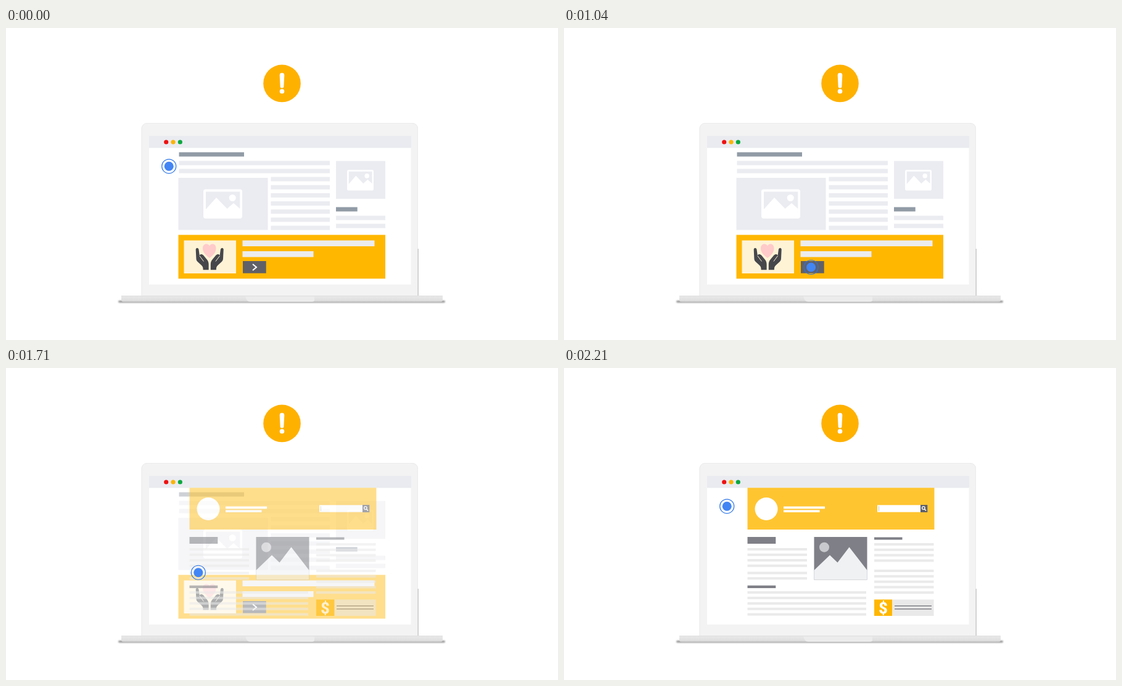
These frames come from a looping animation (895x506 px, 5.04 s). An HTML page:

```html
<!DOCTYPE html>
<html lang="en">
<head>
<meta charset="utf-8">
<title>Donation page on a laptop</title>
<style>
html, body { margin: 0; width: 100%; height: 100%; overflow: hidden; background: #fff; }
svg { display: block; width: 895px; height: 506px; }
</style>
</head>
<body>
<svg viewBox="0 0 895 506">
  <defs>
    <linearGradient id="base" x1="0" y1="0" x2="0" y2="1">
      <stop offset="0" stop-color="#e9e9e9"/>
      <stop offset=".75" stop-color="#dfdfdf"/>
      <stop offset="1" stop-color="#c4c4c4"/>
    </linearGradient>
    <filter id="soft" x="-5%" y="-200%" width="110%" height="500%"><feGaussianBlur stdDeviation="1.2"/></filter>
    <g id="picture">
      <rect width="63" height="47.5" rx="4" fill="#fff"/>
      <path d="M4 4H59.3V31.5L49 22.5L38.5 31.5L21 13.5L4 32.5Z" fill="#ebecf1"/>
      <circle cx="47.2" cy="14" r="5.5" fill="#fff"/>
    </g>
    <g id="hand">
      <path d="M307.7 359.2c0-3.4 4.4-3.4 4.8 0l1.3 9.6c1-2.4 4.6-2.2 6.2-.2l5.8 7c2 2.4 2.8 5 2.8 8v8.6h-9c0-4-.8-5.6-3-7.6l-6-5.6c-1.6-1.6-2-3-2.2-5z" fill="#46474b"/>
      <path d="M313.8 369.5L320.5 378.5" stroke="#fff3d6"/>
    </g>
  </defs>

  <circle cx="447.5" cy="89.9" r="30.3" fill="#ffb100"/>
  <path d="M443.7 76.5a3.8 3.8 0 0 1 7.6 0l-.9 18a2.9 2.9 0 0 1-5.8 0z" fill="#fff"/>
  <circle cx="447.5" cy="102.8" r="3.8" fill="#fff"/>

  <!-- laptop -->
  <rect x="182" y="442" width="530" height="3.5" rx="1.7" fill="#999" filter="url(#soft)"/>
  <path d="M219.5 434.5V163a9 9 0 0 1 9-9H659a9 9 0 0 1 9 9V434.5Z" fill="#f3f3f3"/>
  <path d="M220 434V163a8.5 8.5 0 0 1 8.5-8.5H659a8.5 8.5 0 0 1 8.5 8.5V434" fill="none" stroke="#ebebeb"/>
  <path d="M668.2 358V434" stroke="#b5b5b5"/>
  <path d="M187 434.5H708V441q0 3.5-5 3.5H192q-5 0-5-3.5Z" fill="url(#base)"/>
  <path d="M388 435H500V441q0 3-4 3H396q-6 0-8-9Z" fill="#ececec"/>
  <path d="M187 434.7H708" stroke="#d6d6d6" stroke-width=".8"/>
  <rect x="232" y="175" width="424.5" height="241" fill="#fff"/>
  <rect x="232" y="175" width="425" height="19.5" fill="#e9ebf0"/>
  <circle cx="259.7" cy="185" r="3.6" fill="#ee1111"/>
  <circle cx="271" cy="185" r="3.6" fill="#fbb400"/>
  <circle cx="282.3" cy="185" r="3.6" fill="#0da83f"/>

  <g id="article">
    <g id="articleBars"></g>
    <use href="#picture" x="320" y="261.5"/>
    <use href="#picture" transform="translate(553 230) scale(.683 .705)"/>
    <path d="M330 373C325 369 319 364.500 319 357.500C319 349.500 327 348 330 353.500C333 348 340.500 349.500 340.500 357.500C340.500 364.500 335 369 330 373Z" fill="#ffcaca"/>
    <use href="#hand"/>
    <use href="#hand" transform="matrix(-1 0 0 1 660.4 0)"/>
    <g id="button">
      <rect x="384" y="378" width="37.7" height="19.7" fill="#5f6068"/>
      <path d="M400 383L406 388L400 393" fill="none" stroke="#fff" stroke-width="2"/>
    </g>
  </g>

  <g id="landing">
    <g id="landingBars"></g>
    <circle cx="328" cy="228.500" r="18.500" fill="#fff"/>
    <path d="M510.500 224V232" stroke="#bbb" stroke-width=".8"/>
    <circle cx="582.800" cy="227" r="2.300" fill="none" stroke="#fff" stroke-width="1.300"/>
    <path d="M584.500 228.800L587 231.500" stroke="#fff" stroke-width="1.500"/>
    <path d="M405.500 343.500V328L431 303.500L443.500 315.500L462.500 290.500L491.500 328V343.500Z" fill="#f0f1f3"/>
    <circle cx="422" cy="290.700" r="8" fill="#c8c9cc"/>
    <text x="517.500" y="397.500" text-anchor="middle" font-family="Roboto, sans-serif" font-weight="900" font-size="25" fill="#fff">$</text>
  </g>

  <g id="cursor">
    <circle r="7.500" fill="#4285f4"/>
    <circle r="11.500" fill="none" stroke="#2b74e6" stroke-width="1.200"/>
  </g>
</svg>
<script>
const $ = id => document.getElementById(id);

function bar(parent, x, y, right, bottom, fill) {
  const r = document.createElementNS('http://www.w3.org/2000/svg', 'rect');
  const attrs = { x, y, width: right - x, height: bottom - y, fill };
  for (const k in attrs) r.setAttribute(k, attrs[k]);
  parent.append(r);
}

function lines(parent, x, right, y, count, step, height, fill) {
  for (let i = 0; i < count; i++) bar(parent, x, y + i * step, right, y + i * step + height, fill);
}

const pale = '#ebecf1', slate = '#919ba6', grey = '#7f8087', light = '#eaeaea';

const a = $('articleBars');
bar(a, 280.5, 201.5, 386, 208.5, slate);
lines(a, 280.5, 525, 215.5, 2, 13, 7, pale);
bar(a, 279.5, 243, 424.5, 327.5, pale);
lines(a, 429.5, 525, 241.6, 7, 13.17, 7, pale);
bar(a, 535, 215.7, 615, 277, pale);
bar(a, 535, 290.5, 569.7, 297.5, slate);
lines(a, 535, 615, 304.5, 2, 13, 7, pale);
bar(a, 279.5, 335.5, 615, 406.5, '#ffb700');
bar(a, 288.5, 344.5, 373, 398, '#fff3d6');
bar(a, 383.5, 344.5, 597.5, 354, '#ececef');
bar(a, 383.5, 362, 498.5, 371.5, '#ececef');

const b = $('landingBars');
bar(b, 297.5, 194.3, 600.5, 262, '#ffc531');
bar(b, 356, 224.5, 423, 228.3, '#fff');
bar(b, 356, 230.3, 414.5, 234, '#fff');
bar(b, 508, 222.3, 578, 233.7, '#fff');
bar(b, 578, 222, 589.3, 234, '#5f6068');
bar(b, 297.5, 274, 343.3, 285, grey);
lines(b, 297.5, 394, 292, 4, 8.9, 4, light);
lines(b, 297.5, 394, 330.5, 2, 8.7, 4, light);
bar(b, 405.5, 274, 491.5, 343.5, grey);
bar(b, 503, 274.5, 548.5, 278.5, grey);
lines(b, 503, 599.5, 284, 4, 8.8, 4, light);
lines(b, 503, 599.5, 327, 5, 8.8, 4, light);
bar(b, 297.5, 352.7, 343.3, 357, grey);
lines(b, 297.5, 490, 362, 5, 8.9, 4, light);
bar(b, 503, 375.5, 532.3, 402, '#ffb700');
bar(b, 533, 375.5, 599.5, 402, '#e9e9e9');
lines(b, 536, 596, 385, 2, 5, 1.6, '#85868c');

const LOOP = 5040, STEP = 1000 / 24, LAST = 53;
const ramp = (n, from, to) => Math.min(1, Math.max(0, (n - from) / (to - from)));
const smooth = p => p * p * (3 - 2 * p);
const bezier = (u, p, q, r) => (1 - u) ** 2 * p + 2 * u * (1 - u) * q + u * u * r;

function draw() {
  const t = performance.now() % LOOP;
  const n = Math.min(LAST, Math.floor((t + 4) / STEP));

  // the pointer goes to the button and returns along the same curve
  const u = n < 31 ? smooth(ramp(n, 0, 26.5)) : 1 - smooth(ramp(n, 31, LAST));
  const x = bezier(u, 264.2, 270, 403), y = bezier(u, 224.3, 335, 389);
  $('cursor').setAttribute('transform', `translate(${x} ${y})`);

  const press = 1 - 0.18 * Math.sin(Math.PI * ramp(n, 25, 36)) ** 2;
  $('button').setAttribute('transform', `translate(402.8 387.8) scale(${press}) translate(-402.8 -387.8)`);

  const fade = ramp(n, 36.7, 44.4);
  $('article').setAttribute('opacity', 1 - fade);
  $('landing').setAttribute('opacity', fade);
  requestAnimationFrame(draw);
}
draw();
</script>
</body>
</html>
```
